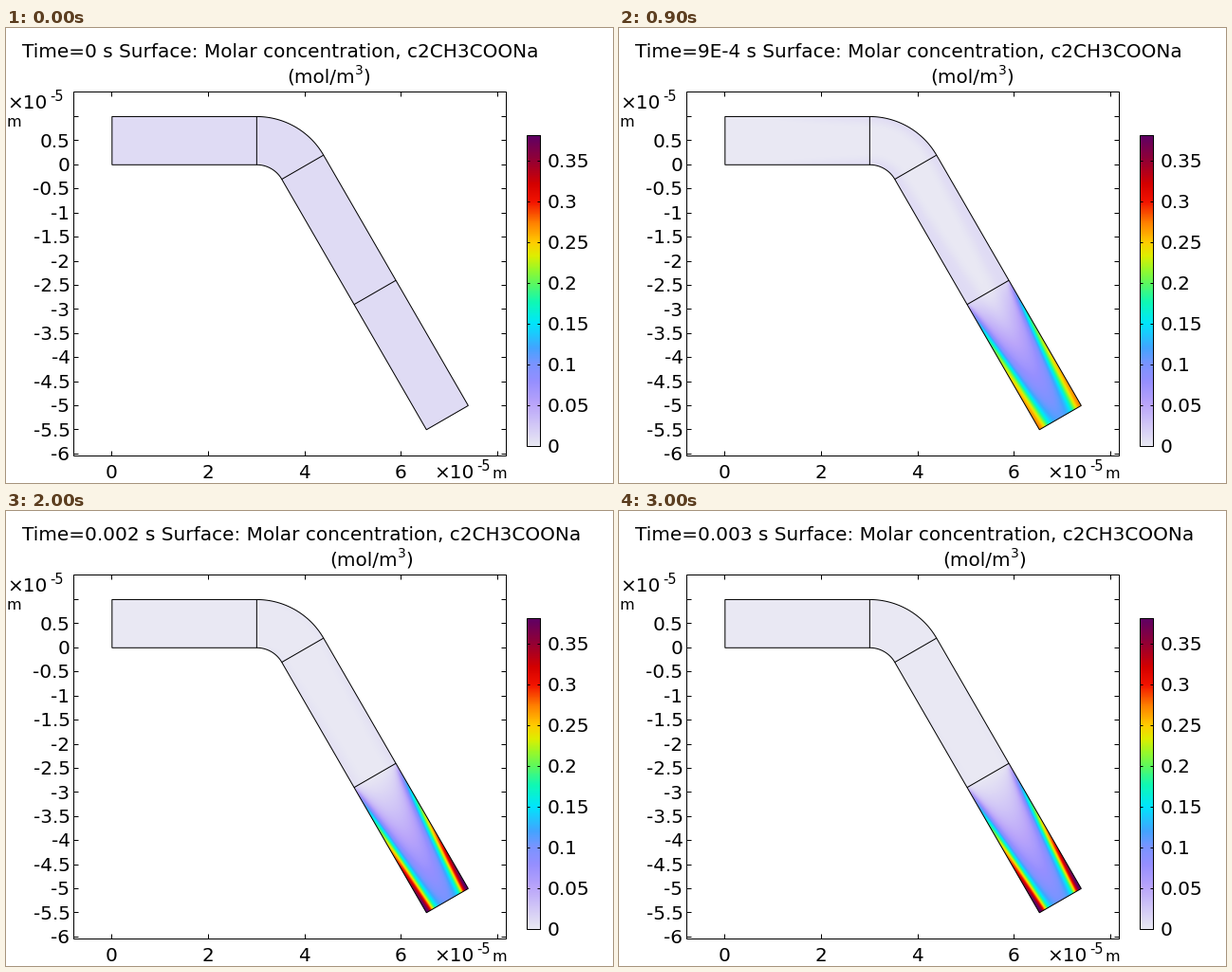
Write a matplotlib script that moves like this. It is 640 px wide and 480 px high and loops after 3.1 s.

```python
import numpy as np
import matplotlib.pyplot as plt
from matplotlib.animation import FuncAnimation
from matplotlib.colors import LinearSegmentedColormap
from matplotlib.patches import Polygon, Rectangle

W, H, DPI = 640, 480, 100
FRAMES, INTERVAL = 31, 100
PT = 72 / DPI                         # points per pixel
OX, OY, SCALE = 111.3, 143.8, 50.85   # plot origin and pixels per 1e-5 m
CMAX = 0.3813

# Channel: straight, 60 degree bend, straight, reacting straight
STRAIGHT, R_IN, BEND = 3.0, 0.6, np.pi / 3
R_MID = R_IN + 0.5
BEND_END = STRAIGHT + R_MID * BEND
REACT = BEND_END + STRAIGHT
LENGTH = REACT + STRAIGHT

# Flow, in channel widths and time steps of 1e-4 s
U_MAX, DIFF, RATE, C_START = 0.9, 0.001, 0.03, 0.01

STOPS = [
    (0.000, (233, 232, 243)), (0.050, (186, 165, 250)),
    (0.078, (150, 143, 255)), (0.100, (122, 148, 255)),
    (0.120, (65, 165, 255)), (0.150, (0, 230, 252)),
    (0.176, (15, 249, 180)), (0.200, (92, 248, 95)),
    (0.218, (155, 248, 40)), (0.234, (222, 238, 0)),
    (0.250, (255, 205, 0)), (0.274, (255, 130, 0)),
    (0.300, (243, 20, 0)), (0.322, (212, 0, 0)),
    (0.350, (150, 0, 50)), (CMAX, (95, 0, 100)),
]
prism = LinearSegmentedColormap.from_list(
    "prism_light", [(v / CMAX, np.array(c) / 255) for v, c in STOPS], N=512)


def to_px(x, y):
    return OX + SCALE * np.asarray(x), OY - SCALE * np.asarray(y)


def wall(radius):
    """Points of one channel wall, from inlet to outlet."""
    a = np.linspace(0, BEND, 40)
    x = STRAIGHT + radius * np.sin(a)
    y = -R_IN + radius * np.cos(a)
    far = 2 * STRAIGHT
    x = np.r_[0, x, x[-1] + far * np.cos(BEND)]
    y = np.r_[y[0], y, y[-1] - far * np.sin(BEND)]
    return np.column_stack(to_px(x, y))


def simulate():
    """Advection, cross diffusion and a uniform source; half channel."""
    nx, ny, dt = 203, 40, 0.025
    dx, dy = LENGTH / nx, 0.5 / ny
    xi = (np.arange(nx) + 0.5) * dx
    s = (np.arange(ny) + 0.5) / ny
    u = U_MAX * (1 - s ** 2)
    source = RATE * (xi > REACT)[:, None]
    c = np.full((nx, ny), C_START)
    states = [c]
    for _ in range(FRAMES - 1):
        for _ in range(round(1 / dt)):
            upstream = np.vstack([np.zeros(ny), c[:-1]])
            curve = np.diff(np.pad(c, ((0, 0), (1, 1)), mode="edge"), 2, axis=1)
            c = c + dt * (u * (upstream - c) / dx + DIFF * curve / dy ** 2 + source)
        states.append(c)
    return states


def channel_coords():
    """Distance along the channel and from its middle, for every pixel."""
    px, py = np.meshgrid(np.arange(W), np.arange(H))
    x, y = (px - OX) / SCALE, (OY - py) / SCALE
    dx, dy = x - STRAIGHT, y + R_IN
    phi = np.arctan2(dx, dy)
    co, si = np.cos(BEND), np.sin(BEND)
    where = [x < STRAIGHT, phi < BEND]
    along = np.select(where, [x, STRAIGHT + R_MID * phi],
                      BEND_END + dx * co - dy * si)
    across = np.select(where, [y - 0.5, np.hypot(dx, dy) - R_MID],
                       dx * si + dy * co - R_MID)
    return along, np.abs(across)


def cell_weights(pos, size, n):
    f = np.clip(pos / size * n - 0.5, 0, n - 1.001)
    i = f.astype(int)
    return i, f - i


states = simulate()
along, across = channel_coords()
NX, NY = states[0].shape
I, FI = cell_weights(along, LENGTH, NX)
J, FJ = cell_weights(across, 0.5, NY)


def field(n):
    c = states[n]
    near = c[I, J] * (1 - FJ) + c[I, J + 1] * FJ
    far = c[I + 1, J] * (1 - FJ) + c[I + 1, J + 1] * FJ
    return near * (1 - FI) + far * FI


# Whole coordinates are pixel centres, so shapes are drawn without snapping
fig = plt.figure(figsize=(W / DPI, H / DPI), dpi=DPI, facecolor="white")
ax = fig.add_axes([0, 0, 1, 1])
ax.axis("off")


def text(x, y, s, size=20, ha="left"):
    return ax.text(x - 0.5, y - 0.5, s, fontsize=size * PT,
                   family="DejaVu Sans", ha=ha, va="baseline", color="black")


def line(x, y):
    ax.plot(x, y, color="black", lw=PT, solid_capstyle="butt",
            snap=False, zorder=3)


def x_tick(x, y0, y1):
    line([round(x)] * 2, [y0, y1])


def y_tick(y, x0, x1):
    line([x0, x1], [round(y)] * 2)


def box(x0, y0, x1, y1):
    ax.add_patch(Rectangle((x0, y0), x1 - x0, y1 - y0, fill=False,
                           ec="black", lw=PT, snap=False, zorder=3))


def power(x, y):
    text(x, y, "×10")
    text(x + 45, y - 8, "-5", 14.5)


# Channel surface and outline
inner, outer = wall(R_IN), wall(R_IN + 1)
outline = Polygon(np.vstack([outer, inner[::-1]]), closed=True, fill=False,
                  ec="black", lw=PT, snap=False, zorder=3)
ax.add_patch(outline)
surface = ax.imshow(field(0), cmap=prism, vmin=0, vmax=CMAX, aspect="auto",
                    interpolation="nearest",
                    extent=(-0.5, W - 0.5, H - 0.5, -0.5), zorder=1)
surface.set_clip_path(outline)
mid = (inner[-2] + inner[-1]) / 2, (outer[-2] + outer[-1]) / 2
for a, b in [(inner[1], outer[1]), (inner[-2], outer[-2]), mid]:
    line([a[0], b[0]], [a[1], b[1]])

# Plot frame, ticks and labels
LEFT, TOP, RIGHT, BOTTOM, TICK = 71, 67, 527, 451, 5
box(LEFT, TOP, RIGHT, BOTTOM)
for v in range(0, 9, 2):
    x = float(to_px(v, 0)[0])
    x_tick(x, TOP, TOP + TICK)
    x_tick(x, BOTTOM - TICK, BOTTOM)
    if v < 8:
        text(x, 475, f"{v}", ha="center")
for v in np.arange(-6, 1.1, 0.5):
    y = float(to_px(0, v)[1])
    y_tick(y, LEFT, LEFT + TICK)
    y_tick(y, RIGHT - TICK, RIGHT)
    if v < 1:
        text(67.5, y + 7.2, f"{v:g}", ha="right")
power(1, 85)
text(1, 104, "m", 16)
power(451, 475)
text(512, 475, "m", 16)

# Colour scale
B_LEFT, B_TOP, B_RIGHT, B_BOTTOM = 549, 113, 563, 441
ax.imshow(np.linspace(CMAX, 0, 329)[:, None], cmap=prism, vmin=0, vmax=CMAX,
          aspect="auto", interpolation="nearest",
          extent=(B_LEFT, B_RIGHT, B_BOTTOM, B_TOP), zorder=1)
box(B_LEFT, B_TOP, B_RIGHT, B_BOTTOM)
for i in range(8):
    v = 0.05 * i
    y = B_BOTTOM - v / CMAX * (B_BOTTOM - B_TOP)
    y_tick(y, B_LEFT, B_LEFT + 3)
    y_tick(y, B_RIGHT - 3, B_RIGHT)
    text(571, y + 7.2, f"{v:.2g}")

# Title; the unit below keeps a fixed distance to the title's end
title = text(17, 31, "", 20.07)
unit = [(0, text(0, 57, "(mol/m")), (71.5, text(0, 49, "3", 13.7)),
        (80.2, text(0, 57, ")"))]

ax.set_xlim(-0.5, W - 0.5)
ax.set_ylim(H - 0.5, -0.5)


def time_label(n):
    return f"{n}E-4" if 0 < n < 10 else f"{n / 1e4:g}"


def update(n):
    surface.set_data(field(n))
    title.set_text(f"Time={time_label(n)} s Surface: "
                   "Molar concentration, c2CH3COONa")
    start = title.get_window_extent().x1 - 265.8
    for shift, part in unit:
        part.set_x(start + shift)
    return [surface, title] + [part for _, part in unit]


anim = FuncAnimation(fig, update, frames=FRAMES, interval=INTERVAL,
                     repeat=True, repeat_delay=0, blit=False)
plt.show()
```
